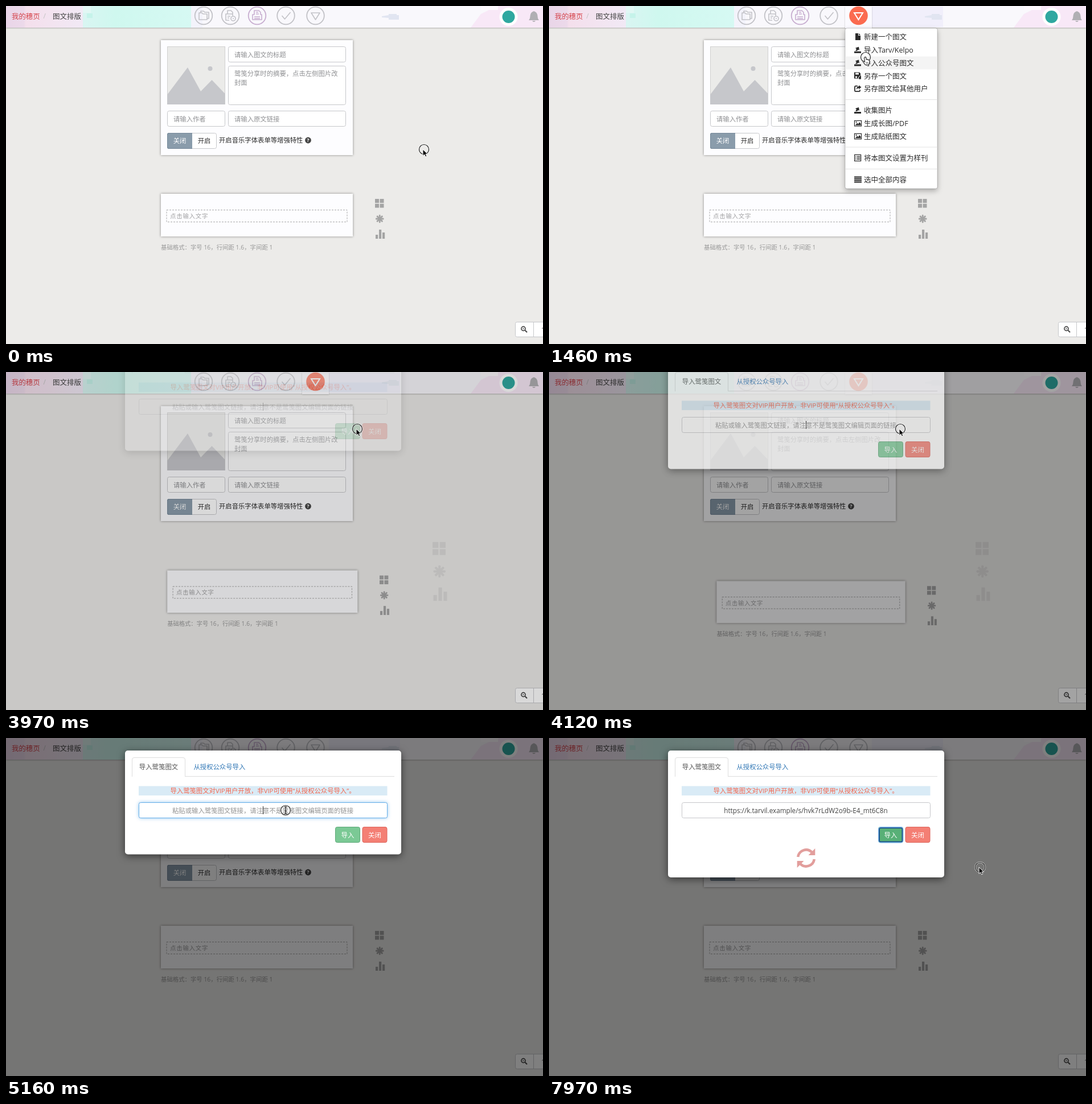
An HTML page for the animation above (8 s loop, 943x594 px).

```html
<!DOCTYPE html>
<html lang="zh-CN">
<head>
<meta charset="utf-8">
<title>图文排版</title>
<style>
html, body { margin: 0; width: 100%; height: 100%; overflow: hidden; background: #ecebe9; }
svg { display: block; width: 943px; height: 594px; }
text { font-family: "Open Sans", "Noto Sans CJK SC", "Noto Sans CJK", sans-serif; white-space: pre; }
.card { fill: #fdfdff; filter: drop-shadow(0 0 2px rgba(0,0,0,.42)); }
.pop { filter: drop-shadow(0 4px 5px rgba(0,0,0,.28)); }
.dialog { filter: drop-shadow(0 3px 7px rgba(0,0,0,.55)); }
.glow { filter: drop-shadow(0 0 3px rgba(102,175,233,.7)); }
.bar { filter: drop-shadow(0 1px 1px rgba(0,0,0,.25)); }
</style>
</head>
<body>
<svg id="stage" viewBox="0 0 943 594" xmlns="http://www.w3.org/2000/svg"></svg>
<script>
const LOOP = 8000, STEP = 148, LEAD = 28;

// ---- markup helpers ----
const text = (x, mid, str, size, fill, anchor = 'start', extra = '') =>
  `<text x="${x}" y="${mid + size * 0.37}" font-size="${size}" fill="${fill}" text-anchor="${anchor}" ${extra}>${str}</text>`;
const rect = (x, y, w, h, fill, extra = '') =>
  `<rect x="${x}" y="${y}" width="${w}" height="${h}" fill="${fill}" ${extra}/>`;
const path = (d, fill, extra = '') => `<path d="${d}" fill="${fill}" ${extra}/>`;
const line = (d, color, w = 1, extra = '') =>
  path(d, 'none', `stroke="${color}" stroke-width="${w}" ${extra}`);
const disc = (x, y, r, fill, extra = '') => `<circle cx="${x}" cy="${y}" r="${r}" fill="${fill}" ${extra}/>`;
const group = (id, body, extra = '') => `<g id="${id}" ${extra}>${body}</g>`;
const at = (x, y, body) => `<g transform="translate(${x} ${y})">${body}</g>`;
const field = (x, y, w, h, fill = '#fff') => rect(x + .5, y + .5, w - 1, h - 1, fill, 'rx="3" stroke="#c6c7ca"');

// ---- header ----
const ring = (x, color, glyph) => at(x, 17,
  disc(0, 0, 15.3, 'none', `stroke="${color}" stroke-width="1.8"`) + line(glyph, color, 1.6, 'stroke-linejoin="round"'));

function header() {
  const gray = '#c2c2c7';
  return rect(0, 0, 943, 38, '#f9f8fc', 'class="bar"') +
    rect(0, 0, 135, 38, 'url(#pink)') +
    rect(135, 0, 190, 38, 'url(#mint)') +
    rect(135, 0, 14, 12, '#e2f7f4') + rect(142, 13, 10, 8, '#c5f3ea') +
    rect(325, 0, 20, 38, '#f3f3fb') +
    path('M816 38L834 14L850 6L866 0H943V38Z', '#f8e8f7') +
    rect(834, 0, 30, 7, '#fdf9fd') +
    group('tint', rect(567, 1, 125, 36, '#f1effb')) +
    path('M660 18L672 16V14H686V16H690V24H672V21L660 20Z', '#e1e5f1') +
    text(10, 18, '我的穗页', 12.4, '#d5444c') +
    text(65.5, 18, '/', 12, '#c2c2c2') +
    text(82, 18, '图文排版', 12.5, '#444') +
    ring(347, gray, 'M-8 7V-5H-3L-1 -3H6V7ZM-5 -5V-8H0L2 -6H9V5H6') +
    ring(394, gray, 'M-2 8H-8V-3H4V0M-5 -3V-9H1L4 -6V-3M-5 1H0M-5 4H-2M1 5a4 4 0 1 0 8 0a4 4 0 1 0 -8 0M4 5H6') +
    ring(441, '#c8aed0', 'M-8 7V-2H-5V-9H3L6 -6V-2H8V7ZM-5 2H5M-2 -6H2M-2 -3H3M-5 5H5') +
    ring(491.5, gray, 'M-7 0L-2 6L8 -6') +
    group('hot', rect(520, 1, 47, 38, '#fbfaff', 'class="bar"') + disc(543.5, 17, 16.3, '#fb6b50') +
      line('M536 12H551L543.5 24Z', '#fff', 2)) +
    group('cold', ring(543.5, gray, 'M-7.5 -5H7.5L0 7Z')) +
    disc(882.5, 19, 16, '#fff') + disc(882.5, 19, 11, '#2fa8a0') +
    path('M918 25C921 22 920 18 921 15C922 11 925 10 927 9C929 10 932 11 933 15C934 18 933 22 936 25ZM924 26H930Q927 30 924 26Z', '#b0afb3');
}

// ---- page ----
function coverCard() {
  const hint = '#8f9093', s = 11.35;
  return rect(272, 60, 337, 202, '#fdfdff', 'class="card"') +
    rect(283.5, 71.5, 101, 101, '#ebebe9', 'stroke="#d0d0d0"') +
    path('M283 156L319 108L342 150L361.500 130L384.500 154V173H283Z', '#c6c7cb') + disc(358.500, 110, 4, '#c6c7cb') +
    field(390, 71, 207, 28) + text(401, 86, '请输入图文的标题', s, hint) +
    field(390, 105, 207, 69) + text(401, 118.5, '鹭笺分享时的摘要，点击左侧图片改', s, hint) +
    text(401, 135, '封面', s, hint) +
    field(283, 184, 102, 28) + text(294, 198.5, '请输入作者', s, hint) +
    field(390, 184, 207, 28) + text(401, 198.5, '请输入原文链接', s, hint) +
    field(283, 223, 87, 28) +
    path('M327 223H286Q283 223 283 226V248Q283 251 286 251H327Z', '#8a9cab') +
    line('M327 223.500H286Q283.500 223.500 283.500 226V248Q283.500 250.500 286 250.500H327', '#76889a') +
    text(305, 237, '关闭', s, '#fff', 'middle') + text(348, 237, '开启', s, '#333', 'middle') +
    text(374, 236, '开启音乐字体表单等增强特性', s, '#2b2b2b') +
    disc(530.500, 236, 5.4, '#444') + text(530.500, 236, '?', 9, '#fff', 'middle', 'font-weight="700"');
}

function tools() {
  let out = '';
  for (const x of [648, 656.5]) for (const y of [339, 347.5]) out += rect(x, y, 7, 7, '#a4a4a4');
  for (let a = 0; a < 180; a += 45)
    out += rect(649, 372.6, 14.5, 2.8, '#a4a4a4', `rx="1" transform="rotate(${a} 656.25 374)"`);
  return out + rect(649, 402, 4.2, 7, '#a4a4a4') + rect(655, 393, 4.2, 16, '#a4a4a4') + rect(661, 398, 4.2, 11, '#a4a4a4');
}

const bodyCard = () => rect(272, 330, 337, 75, '#fdfdff', 'class="card"') +
  rect(282, 358.500, 317, 21, 'none', 'stroke="#a9a9a9" stroke-dasharray="3 2"') +
  text(288, 369, '点击输入文字', 10.5, '#a2a2a4', 'start', 'letter-spacing=".7"') +
  text(272, 424, '基础格式：字号 16，行间距 1.6，字间距 1', 10.4, '#989898') + tools();

const zoomBox = () => field(894, 555, 60, 27) + line('M926.500 555V582', '#c6c7ca') +
  disc(908.500, 567, 3.6, 'none', 'stroke="#444" stroke-width="1.6"') +
  line('M911.500 570L915 573.500', '#444', 2) + line('M906.800 567H910.200', '#444') + text(940, 568.500, '100%', 11, '#444');

// ---- menu ----
const ink = '#2a2a2a';
const glyph = {
  doc: path('M2 0H7V4H11V12H2ZM8 0L11 3H8Z', ink),
  load: path('M0 9H12V12H0ZM2 8L4 5L2 3L8 1L9 7L7 6L5 8Z', ink),
  save: path('M0 0H9L11 2V6H9V8H7V11H0ZM2 1V4H8V1ZM2 7V10H5V7Z', ink, 'fill-rule="evenodd"') + path('M8 8H10V6H12V12H8Z', ink),
  share: line('M6 1.500H2.500Q1 1.500 1 3V9.500Q1 11 2.500 11H8.500Q10 11 10 9.500V8', ink, 1.8) +
    path('M8 0L12.500 3.500L8 7V5Q5 5 4 8Q3.500 2.500 8 2Z', ink),
  image: rect(.5, 1.5, 12, 9.5, '#fff', `stroke="${ink}" stroke-width="1.2"`) +
    path('M2 9.500L5 5.500L7 7.500L9 4L11.500 7V9.500Z', ink) + disc(3.700, 4, 1.1, ink),
  list: rect(.6, .6, 11, 11, '#fff', `stroke="${ink}" stroke-width="1.2"`) +
    line('M2 3.500H3.200M4.500 3.500H10.500M2 6H3.200M4.500 6H10.500M2 8.500H3.200M4.500 8.500H10.500', ink, 1.2),
  rows: line('M0 1.500H13M0 4.500H13M0 7.500H13M0 10.500H13', ink, 1.9)
};
const items = [
  [54.5, 'doc', '新建一个图文'], [77.3, 'load', '导入Tarv/Kelpo'], [100, 'load', '导入公众号图文'],
  [123, 'save', '另存一个图文'], [145.7, 'share', '另存图文给其他用户'], [183.5, 'load', '收集图片'],
  [206.5, 'image', '生成长图/PDF'], [229.3, 'image', '生成贴纸图文'], [267.3, 'list', '将本图文设置为样刊'],
  [305.5, 'rows', '选中全部内容']
];
const menu = () => rect(520, 39, 162, 282, '#fff', 'rx="3" class="pop" stroke="rgba(0,0,0,.2)"') +
  group('hover', rect(520.5, -11.4, 161, 22.8, '#f4f4f4')) +
  [164.5, 248, 286.5].map(y => line(`M520.500 ${y}H681.500`, '#e3e3e3')).join('') +
  items.map(([y, icon, label]) => at(536, y - 6.5, glyph[icon]) + text(553, y, label, 12.5, ink)).join('');

// ---- dialog ----
const button = (id, x, label, fill, edge) =>
  `<rect id="${id}" x="${x}" y="156.5" width="43" height="27" rx="3" fill="${fill}" stroke="${edge}"/>` +
  text(x + 21.5, 170.5, label, 11.4, '#fff', 'middle');

const spinner = () => {
  const half = line('M-14.300 -2A14.400 14.400 0 0 1 10 -10.400', '#e29e9c', 4.6) + path('M15.800 -17V-5H4Z', '#e29e9c');
  return half + `<g transform="rotate(180)">${half}</g>`;
};

const dialog = () =>
  `<rect id="panel" x="209" y="22" width="485" height="182.500" rx="5" fill="#fff" class="dialog"/>` +
  line('M221 67.500H682', '#ddd') +
  path('M221.500 68V38Q221.500 34.500 225 34.500H311Q314.500 34.500 314.500 38V68', '#fff', 'stroke="#ddd"') +
  text(268, 51, '导入鹭笺图文', 11.4, '#555', 'middle') +
  text(329.5, 51, '从授权公众号导入', 11.35, '#2f76b5') +
  rect(233, 84.5, 436.5, 16.5, '#d9ebf6') +
  text(451, 92.7, '导入鹭笺图文对VIP用户开放，非VIP可使用“从授权公众号导入”。', 11.35, '#f4664e', 'middle') +
  field(233, 113, 437, 28) +
  group('focus', rect(233.5, 113.5, 436, 27, '#fff', 'rx="3" stroke="#66afe9" class="glow"')) +
  group('hint', text(451, 127.3, '粘贴或输入鹭笺图文链接，请注意不是鹭笺图文编辑页面的链接', 11.36, '#929292', 'middle')) +
  group('link', text(451, 127.3, 'https://k.tarvil.example/s/hvk7rLdW2o9b-E4_mt6C8n', 11.7, '#444', 'middle')) +
  group('caret', rect(451, 120, 1, 14, '#222')) +
  button('ok', 578.5, '导入', '#7bc995', '#5da878') +
  button('no', 626, '关闭', '#f47f74', '#dd655c') +
  group('okRing', rect(580, 158, 40.5, 24.5, 'none', 'rx="2" stroke="#194f91" stroke-width="2"') +
    rect(578.5, 156.5, 43.5, 27.5, 'none', 'rx="4" stroke="#8cc4ee" stroke-width="1.3"')) +
  group('spin', spinner());

// ---- pointer ----
const pointer = () =>
  disc(0, 0, 8.5, 'none', 'stroke="#fff" stroke-opacity=".55" stroke-width="3"') +
  disc(0, 0, 8.5, 'none', 'stroke="#222" stroke-width="1.2"') +
  group('arrow', path('M-2 0V11.500L.800 9L2.700 13L4.800 12L3 8.200H6.600Z', '#111', 'stroke="#fff" stroke-width=".9"')) +
  group('hand', path('M-1.500 0Q0 -1 .700 .500L1.300 4Q2.500 3.200 3.300 4.300Q4.600 3.700 5.200 5Q6.600 4.700 7 6.500L6.500 10.500L5.300 13.500H-.500L-4.500 8.300Q-4.500 6.500 -2.700 7.200L-1.500 8.300L-2.300 1.300Z', '#fff', 'stroke="#222" stroke-width="1.100"') +
    line('M1.500 8.500V11.500M3.500 8.500V11.500', '#222', .8)) +
  group('beam', line('M-2.500 -6.500Q0 -6.500 0 -5V5Q0 6.500 -2.500 6.500M2.500 -6.500Q0 -6.500 0 -5M0 5Q0 6.500 2.500 6.500M-1.500 1.500H1.500', '#222', 1.2));

document.getElementById('stage').innerHTML =
  `<defs><linearGradient id="pink"><stop offset="0" stop-color="#e9d5e8"/><stop offset=".23" stop-color="#ecd9ea"/>
   <stop offset=".26" stop-color="#f4dfec"/><stop offset="1" stop-color="#f1e9f5"/></linearGradient>
   <linearGradient id="mint"><stop offset="0" stop-color="#d9f5f2"/><stop offset=".3" stop-color="#cff8ef"/>
   <stop offset="1" stop-color="#d6f9f3"/></linearGradient></defs>` +
  rect(0, 0, 943, 594, '#ecebe9') + coverCard() + group('body', bodyCard()) + group('ghost', tools()) +
  zoomBox() + header() + group('menu', menu()) +
  group('shade', rect(0, 0, 943, 594, '#000')) + group('dialog', dialog()) + group('pointer', pointer());

const el = {};
document.querySelectorAll('#stage [id]').forEach(n => el[n.id] = n);
const show = (id, on) => el[id].style.display = on ? '' : 'none';
const move = (id, value) => el[id].setAttribute('transform', value);

// Rows are [step, ...values]; values between rows are linear.
function track(rows, k) {
  let i = rows.findIndex(r => r[0] > k);
  if (i < 0) return rows[rows.length - 1].slice(1);
  if (i === 0) return rows[0].slice(1);
  const a = rows[i - 1], b = rows[i], p = (k - a[0]) / (b[0] - a[0]);
  return a.slice(1).map((v, j) => v + (b[j + 1] - v) * p);
}

const route = [
  [0, 734, 252], [1, 716, 228], [3, 632, 112], [5, 549, 27], [6, 544, 19], [8, 547, 57], [10, 556, 90],
  [11, 585, 100], [13, 655, 120], [15, 600, 170], [16, 577, 178], [17, 578, 178], [19, 578, 178],
  [20, 548, 158], [22, 611, 118], [23, 628, 104], [24, 617, 100], [29, 617, 100], [32, 580, 128],
  [33, 580, 128], [35, 491, 127], [45, 491, 127], [46, 530, 138], [48, 629, 169], [50, 601, 171],
  [51, 601, 171], [53, 757, 227]
];
// step, dialog offset, dialog opacity, shade opacity
const entry = [[26, -90, 0, 0], [27, -66, .25, .15], [28, -34, .7, .36], [29, -13, .94, .46], [30, -4, 1, .5], [31, 0, 1, .5]];
// step, x, y and scale of the editing area
const settle = [[26, 0, 0, 1], [28, 27, 43, .983], [29, 12, 18, .993], [30, 4, 6, .998], [31, 0, 0, 1]];

function draw(t) {
  const k = Math.floor((t + LEAD) / STEP);
  const [x, y] = track(route, k);
  move('pointer', `translate(${x} ${y})`);
  const kind = k < 5 ? 'arrow' : k < 26 ? 'hand' : k < 32 ? 'arrow' : k < 47 ? 'beam' : k < 48 ? 'arrow' : k < 52 ? 'hand' : 'arrow';
  for (const name of ['arrow', 'hand', 'beam']) show(name, name === kind);

  const lit = k >= 5 && k < 29;
  show('hot', lit);
  show('cold', !lit);
  show('tint', k >= 5);
  show('menu', k >= 6 && k < 26);
  const row = items.find(r => Math.abs(r[0] - y) <= 11.4);
  show('hover', !!row);
  if (row) move('hover', `translate(0 ${row[0]})`);

  const [dy, alpha, dim] = track(entry, k);
  move('dialog', `translate(0 ${dy})`);
  el.dialog.style.opacity = alpha;
  el.shade.style.opacity = dim;
  const [bx, by, s] = track(settle, k);
  move('body', `translate(${bx} ${by}) scale(${s})`);
  show('ghost', k === 27 || k === 28);
  move('ghost', 'translate(-210 -203) scale(1.48)');
  el.ghost.style.opacity = .2;

  const sent = k >= 51, pasted = k >= 44;
  show('focus', k >= 29 && !sent);
  show('hint', !pasted);
  show('link', pasted);
  show('caret', k < 38 || (k >= 41 && !pasted));
  show('okRing', sent);
  show('spin', sent);
  move('spin', `translate(451.500 211) rotate(${(k - 54) * 26})`);
  el.panel.setAttribute('height', sent ? 223 : 182.5);
  el.ok.setAttribute('fill', k >= 50 ? '#58b077' : '#7bc995');
  el.no.setAttribute('fill', k === 48 ? '#f2655a' : '#f47f74');
}

function tick() {
  draw(performance.now() % LOOP);
  requestAnimationFrame(tick);
}
tick();
</script>
</body>
</html>
```
